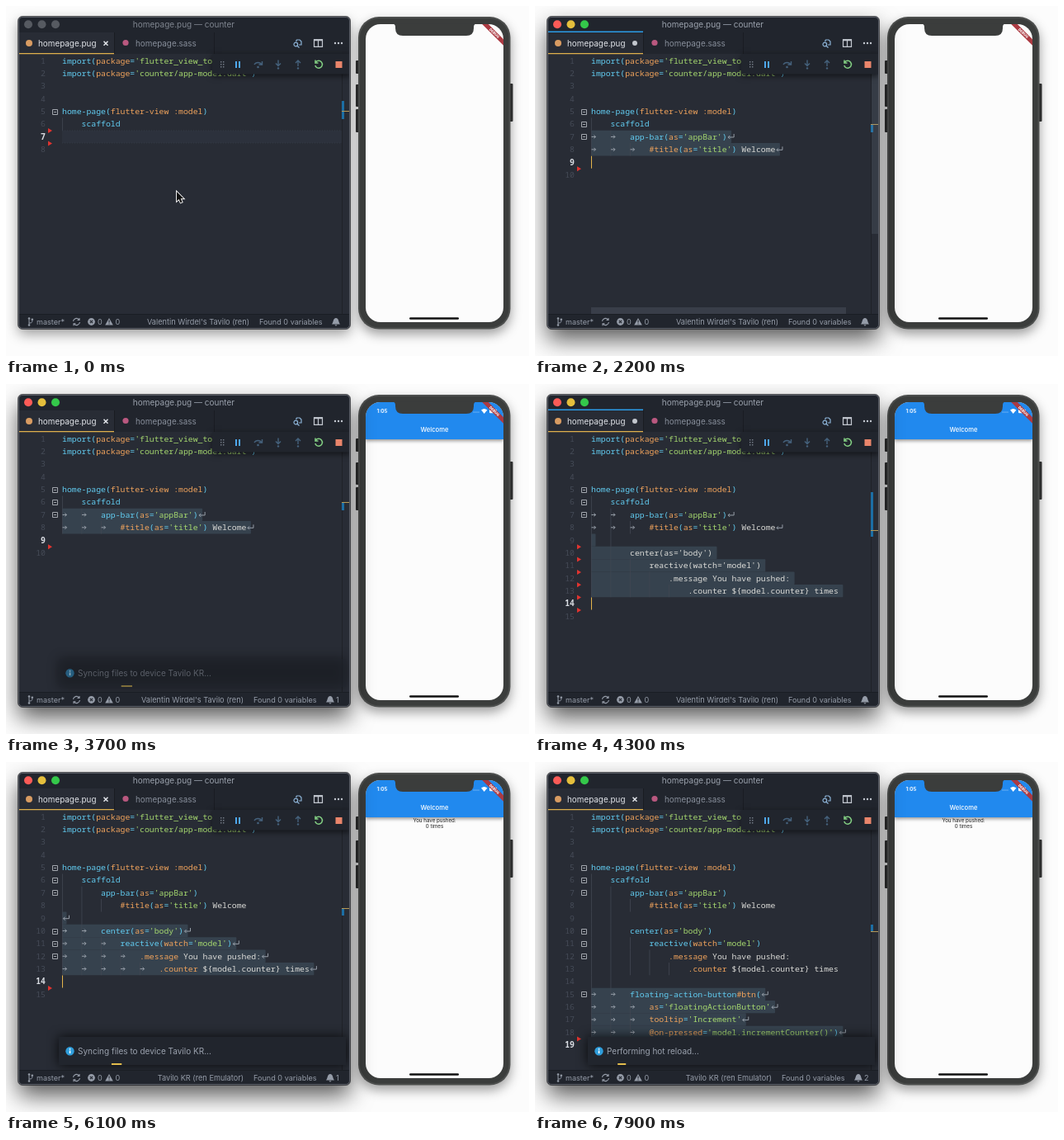
Animation, 634 px wide and 424 px high, one loop 8 s. Source, as an HTML page with a canvas:

```html
<!DOCTYPE html>
<html lang="en">
<head>
<meta charset="utf-8">
<title>Live editing demo</title>
<style>
html, body { margin: 0; width: 634px; height: 424px; overflow: hidden; background: #fcfcfc; }
canvas { display: block; }
</style>
</head>
<body>
<canvas id="stage" width="634" height="424"></canvas>
<script>
const c = document.getElementById('stage').getContext('2d');
const LOOP = 8000, LEFT = 68, CHAR = 5.88, PITCH = 15.36;
const UI = 'Inter, sans-serif', MONO = '"Noto Sans Mono", "DejaVu Sans Mono", monospace';
const DARK = '#21252d', EDITOR = '#282c35', MUTED = '#959ca8';
const COLORS = { c: '#62cdf2', o: '#f0a35c', g: '#a6d96f', w: '#dcdcd8' };

// [indent level, runs]; the first letter of each run picks its colour
const CODE = [
  [0, "cimport(|opackage|c=|g'flutter_view_tools'|c)"],
  [0, "cimport(|opackage|c=|g'counter/app-model.dart'|c)"],
  [0, ''], [0, ''],
  [0, 'chome-page(|oflutter-view :model|c)'],
  [1, 'cscaffold'],
  [2, "capp-bar(|oas|c=|g'appBar'|c)"],
  [3, "o#title|c(|oas|c=|g'title'|c)|w Welcome"],
  [2, ''],
  [2, "ccenter(|oas|c=|g'body'|c)"],
  [3, "creactive(|owatch|c=|g'model'|c)"],
  [4, 'o.message|w You have pushed:'],
  [5, 'o.counter|w ${model.counter} times'],
  [2, ''],
  [2, 'cfloating-action-button|o#btn|c('],
  [3, "oas|c=|g'floatingActionButton'"],
  [3, "otooltip|c=|g'Increment'"],
  [3, "o@on-pressed|c=|g'model.incrementCounter()'|c)"]
].map(([level, runs]) => ({
  level, runs: runs ? runs.split('|').map(r => [COLORS[r[0]], r.slice(1)]) : []
}));

// One entry per paste
const STAGES = [
  { at: 0,    lines: 6,  total: 8,  from: 0,  folds: [5], marks: [6, 7], ruler: [115, 22], tick: 139 },
  { at: 2000, lines: 8,  total: 10, from: 7,  folds: [5, 6, 7], marks: [9], ruler: [143, 10], tick: 143 },
  { at: 4250, lines: 13, total: 15, from: 9,  folds: [5, 6, 7, 10, 11, 12], marks: [14], ruler: [178, 8], tick: 177 },
  { at: 6800, lines: 18, total: 19, from: 15, folds: [5, 6, 7, 10, 11, 12, 15], marks: [18], ruler: [197, 8], tick: 205 }
];
const NOTES = [{ at: 2800, count: 1 }, { at: 5340, count: 1 }, { at: 7470, count: 2 }];
const SAVES = [0, 2750, 5300, 7420];

const clamp = v => Math.max(0, Math.min(1, v));
const lineY = n => 66.3 + PITCH * (n - 1);

function rect(x, y, w, h, fill, r = 0) {
  c.fillStyle = fill;
  c.beginPath(); c.roundRect(x, y, w, h, r); c.fill();
}
function frame(x, y, w, h, color, r) {
  c.strokeStyle = color; c.lineWidth = 1;
  c.beginPath(); c.roundRect(x, y, w, h, r); c.stroke();
}
function dot(x, y, r, fill) {
  c.fillStyle = fill;
  c.beginPath(); c.arc(x, y, r, 0, 7); c.fill();
}
function path(d, color, width = 1) {
  c.strokeStyle = color; c.lineWidth = width;
  c.stroke(new Path2D(d));
}
function shape(d, fill) {
  c.fillStyle = fill;
  c.fill(new Path2D(d));
}
function text(s, x, y, size, color, align = 'left', weight = 400, family = UI) {
  c.font = `${weight} ${size}px ${family}`;
  c.textAlign = align; c.fillStyle = color;
  c.fillText(s, x, y + size * .34);
}
function shadow(blur, dy, alpha) {
  c.shadowColor = `rgba(0,0,0,${alpha})`;
  c.shadowBlur = blur; c.shadowOffsetY = dy;
}
const noShadow = () => shadow(0, 0, 0);
const mono = (s, x, y, color, align, weight = 500) => text(s, x, y, 9.8, color, align, weight, MONO);

function drawTitle(active, dirty) {
  rect(15, 13, 402, 45, DARK);
  ['#fc5b57', '#e5bf3c', '#34c84a'].forEach((color, i) => dot(27 + 16.5 * i, 22.3, 5, active ? color : '#565a61'));
  text('homepage.pug — counter', 215.5, 22.5, 10, active ? '#9aa1ac' : '#7f858f', 'center');

  rect(16, 32, 115, 26, EDITOR);
  rect(131, 32, 1, 26, '#191c22');
  rect(252, 32, 1, 26, '#191c22');
  if (dirty) rect(16, 30.6, 115, 1.3, '#2c9be6');
  rect(16, 57, 115, 1.2, '#dfb04c');
  dot(28, 45, 4, '#d99c62');
  text('homepage.pug', 39, 45.3, 9.9, '#e0e3e8');
  if (dirty) dot(121, 45, 3, '#c3c7ce');
  else path('M118.5 42.8l5 5m0-5l-5 5', '#e0e3e8', 1.5);
  dot(145, 44.5, 3.6, '#b9587f');
  text('homepage.sass', 157, 45.3, 9.9, '#878e9a');

  path('M352 41h4l2 2v4h-3M352 41v2', '#8db4d8', 1.2);
  path('M349 46.5a2.3 2.3 0 1 0 4.6 0a2.3 2.3 0 1 0-4.6 0M353 48.2l2.5 2.3', '#8db4d8', 1.2);
  path('M373.5 40.8h10v8.6h-10zM378.5 41v8', '#c3c8d0', 1.2);
  path('M373 41.3h11', '#c3c8d0', 2);
  for (const x of [399, 403, 407]) dot(x, 45, 1.2, '#c3c8d0');
}

function drawCode(t) {
  const k = STAGES.findLastIndex(s => t >= s.at);
  const s = STAGES[k], age = t - s.at, settled = k === 0 || age >= 150;
  const shown = settled ? s : STAGES[k - 1];
  const clicked = t >= 400;
  const current = k ? s.lines + 1 : clicked ? 8 : 7;
  const endX = n => {
    const { level, runs } = CODE[n - 1];
    return runs.length ? LEFT + CHAR * (level * 4 + runs.map(r => r[1]).join('').length) : LEFT;
  };

  if (!k) {
    rect(LEFT, lineY(current) - 7.5, 339, 15, '#2c313c');
    c.setLineDash([1, 2]);
    path(`M68 ${lineY(current) - 7.5}h339m-339 15h339`, '#39404b', .7);
    c.setLineDash([]);
  }
  if (k) for (let n = s.from; n <= s.lines; n++) {
    rect(LEFT, lineY(n) - 7.7, endX(n) - LEFT + 5.5, PITCH, '#36424e', 1);
  }

  for (let n = 1; n <= s.total; n++) {
    const on = n === current;
    mono(n, 48, lineY(n), on ? '#d9dce2' : '#454b57', 'right', on ? 600 : 400);
  }
  for (let n = 1; n <= s.lines; n++) {
    const { level, runs } = CODE[n - 1], y = lineY(n);
    const plain = !settled && n >= s.from;
    for (let i = 0; i < level; i++) rect(LEFT + i * 4 * CHAR, y - 7.7, .8, PITCH, '#414752');
    let x = LEFT + level * 4 * CHAR;
    for (const [color, word] of runs) {
      mono(word, x, y, plain ? COLORS.w : color);
      x += word.length * CHAR;
    }
    if (shown.from && n >= shown.from && n <= shown.lines) {
      const ink = '#969ea8';
      if (runs.length) for (let i = 0; i < level; i++) {
        path(`M${LEFT + .5 + i * 4 * CHAR} ${y}h5m-2-2l2 2l-2 2`, ink, 1);
      }
      path(`M${endX(n) + 8.5} ${y - 3.5}v4h-7m2-2l-2 2l2 2`, ink, 1);
    }
  }
  for (const n of shown.folds) {
    const y = Math.round(lineY(n)) + .5;
    path(`M56.5 ${y - 3}h6v6h-6zM58 ${y}h3`, '#a2a6ad');
  }
  const marks = settled ? s.marks : Array.from({ length: current - s.from + 1 }, (_, i) => s.from + i);
  for (const n of marks) shape(`M51 ${lineY(n) + 5}l5 3l-5 3z`, '#e2342f');

  const lastEdit = k ? (t >= 4800 && k === 2 ? 4800 : s.at) : 700;
  const blinkOn = t < 700 ? clicked : (t - lastEdit) % 1000 < 500;
  if (clicked && blinkOn) rect(LEFT, lineY(current) - 7.5, 1, 15, '#e5b54c');

  // Scrollbars and overview ruler
  rect(407, 58, .8, 315, '#1d2026');
  const [top, height] = settled ? s.ruler : [131, 54];
  rect(407, top, 3, height, '#1c6ea4');
  rect(407, k || clicked ? s.tick : 127, 9.5, 1, '#b59a59');
  const bars = t < 400 ? 0 : clamp((2700 - t) / 300);
  if (bars) {
    c.globalAlpha = bars;
    rect(408, 58, 8.5, (k ? 276 : 292) - 58, 'rgba(125,135,155,.17)');
    rect(68, 365, 309, 8, 'rgba(125,135,155,.2)');
    c.globalAlpha = 1;
  }
}

function drawDebugBar() {
  shadow(7, 2, .55);
  rect(250, 58, 167, 24.5, DARK);
  noShadow();
  for (let i = 0; i < 6; i++) rect(260 + i % 2 * 3, 67 + (i >> 1) * 3, 1.4, 1.4, '#777e89');
  rect(278, 67, 2, 8, '#4ea6ec');
  rect(282, 67, 2, 8, '#4ea6ec');
  const dim = '#45627d';
  path('M301 71a5 4.5 0 0 1 9 0M310.5 67v4h-4', dim, 1.4);
  dot(305.5, 74, 1.3, dim);
  path('M330 65.5v7m-3-3l3 3l3-3', dim, 1.4);
  dot(330, 75.4, 1.2, dim);
  path('M354 73v-7m-3 3l3-3l3 3', dim, 1.4);
  dot(354, 75.4, 1.2, dim);
  path('M375.6 68a4.4 4.4 0 1 1-.8 4M375 65.5v3.4h3.5', '#83d083', 1.5);
  rect(399.5, 67, 8, 8, '#ea856b');
}

function drawNote(t, note) {
  const age = t - note.at, show = clamp(age / 200), ease = 1 - (1 - show) ** 3;
  c.save();
  c.beginPath(); c.rect(16, 58, 400, 315); c.clip();
  c.globalAlpha = show * clamp((950 - age) / 100);
  c.translate(0, 35 * (1 - ease));
  shadow(14, 0, .8);
  rect(64, 333, 348, 34, DARK);
  noShadow();
  dot(77.5, 350.3, 5.2, '#2f9ddb');
  rect(76.8, 349.6, 1.5, 3.5, '#fff');
  rect(76.8, 347, 1.5, 1.5, '#fff');
  text(age < 600 ? 'Performing hot reload...' : 'Syncing files to device Tavilo KR...', 87, 350.5, 10, '#9ba2ae');
  const p = age / 2000, w = 7 * (1 + 2 * p);
  rect(67.5 + 175 * p - w / 2, 365, w, 2, '#e3bd4d');
  c.restore();
}

function drawStatus(t, note) {
  rect(15, 373, 402, 18, DARK);
  rect(15, 373, 402, .8, '#191c22');
  path('M28 379.5v6M28 384c3.6 0 3.8-1 3.8-3', MUTED);
  for (const [x, y] of [[28, 378.5], [28, 386.5], [31.8, 379.7]]) dot(x, y, 1.3, MUTED);
  text('master*', 37, 382.5, 9.1, MUTED);
  path('M81.5 382a4 4 0 0 1 7-2.2M89 378v2.5h-2.5M89.5 383a4 4 0 0 1-7 2.2M82 387.2v-2.5h2.5', MUTED, 1.1);
  dot(103.5, 382.5, 4.4, MUTED);
  path('M101.8 380.8l3.4 3.4m0-3.4l-3.4 3.4', DARK, 1.1);
  text('0', 111, 382.5, 9.1, MUTED);
  shape('M125 378l4.8 8.6h-9.6z', MUTED);
  rect(124.5, 380.6, 1.1, 3, DARK);
  rect(124.5, 384.4, 1.1, 1.1, DARK);
  text('0', 132.5, 382.5, 9.1, MUTED);

  const shift = note ? 6 + note.count : 0, end = 383.5 - shift;
  text('Found 0 variables', end, 382.5, 9.1, MUTED, 'right');
  text(t < 4800 ? "Valentin Wirdel's Tavilo (ren)" : 'Tavilo KR (ren Emulator)', end - 88.5, 382.5, 9.2, MUTED, 'right');
  const x = 400 - shift;
  shape(`M${x - 5} 385.5c2-2 1.4-7.5 5-7.5s3 5.5 5 7.5zM${x - 1.6} 386.2h3.2l-1.6 1.6z`, MUTED);
  if (note) text(note.count, x + 7, 382.5, 9.1, MUTED);
}

function drawWindow(t) {
  const active = t >= 400;
  const dirty = STAGES.some((s, i) => i && t >= s.at && t < SAVES[i]);
  const note = NOTES.find(n => t >= n.at && t < n.at + 950);
  shadow(active ? 28 : 16, active ? 13 : 6, active ? .65 : .4);
  rect(15, 13, 402, 378, EDITOR, 5);
  noShadow();
  c.save();
  c.beginPath(); c.roundRect(15, 13, 402, 378, 5); c.clip();
  drawTitle(active, dirty);
  drawCode(t);
  drawDebugBar();
  if (note) drawNote(t, note);
  drawStatus(t, note);
  c.restore();
  frame(14.5, 12.5, 403, 379, 'rgba(20,22,26,.7)', 5.5);
  frame(15.5, 13.5, 401, 377, '#5b5f68', 4.5);
}

function drawPhone(t) {
  for (const [x, y, h] of [[424, 66, 16], [424, 95, 27], [424, 125, 28], [610, 94, 46]]) rect(x, y, 4.5, h, '#343535', 1);
  shadow(14, 6, .38);
  rect(427, 13, 184.5, 378.5, '#4c4e4d', 25);
  noShadow();
  rect(429, 15, 180.5, 374.5, '#3b3d3c', 23);

  c.save();
  c.beginPath(); c.roundRect(436, 22, 167, 361, 18); c.clip();
  rect(436, 22, 167, 361, '#fcfcfc');
  if (t >= 3500) {
    shadow(4, 1.5, .4);
    rect(436, 22, 167, 45, '#2189ee');
    noShadow();
    text('1:05', 449.5, 33, 6.5, '#fff', 'left', 600);
    text('Welcome', 519.5, 55, 7.6, '#fff', 'center', 500);
    for (let i = 0; i < 4; i++) dot(567 + 2 * i, 34, .6, '#b9daf8');
    shape('M576 31.5q3.7-3 7.4 0l-3.7 4.6z', '#fff');
    rect(586, 30.7, 9, 4.6, '#fff', 1);
  }
  if (t >= 6000) {
    text('You have pushed:', 519.5, 71, 6.2, '#222', 'center');
    text('0 times', 519.5, 78, 6.2, '#222', 'center');
  }
  c.save();
  c.translate(592, 33); c.rotate(Math.PI / 4);
  rect(-24, -2.7, 48, 5.4, '#ab3a42');
  text('DEBUG', 0, 0, 4.4, '#fff', 'center', 800);
  c.restore();
  c.restore();

  shape('M468 21.5q4 0 4 4v1.5q0 9 9 9h77q9 0 9-9v-1.5q0-4 4-4z', '#3b3d3c');
  rect(489, 377.2, 60, 2.6, '#111', 1.3);
}

function drawPointer(t) {
  if (t > 1300) return;
  const p = clamp((t - 400) / 600), e = p * p * (3 - 2 * p), out = clamp((t - 1000) / 300);
  c.save();
  c.translate(207 + 47 * e + 6 * out, 225 + 187 * e + 18 * out);
  const arrow = 'M0 0v11.5l2.7-2.5l1.9 4.4l2-.9l-1.9-4.2h3.6z';
  path(arrow, '#fff', 1.8);
  shape(arrow, '#111');
  c.restore();
}

function draw(now) {
  const t = now % LOOP;
  rect(0, 0, 634, 424, '#fcfcfc');
  drawPhone(t);
  drawWindow(t);
  drawPointer(t);
}

const start = performance.now();
function tick() {
  draw(performance.now() - start);
  requestAnimationFrame(tick);
}
tick();
</script>
</body>
</html>
```
